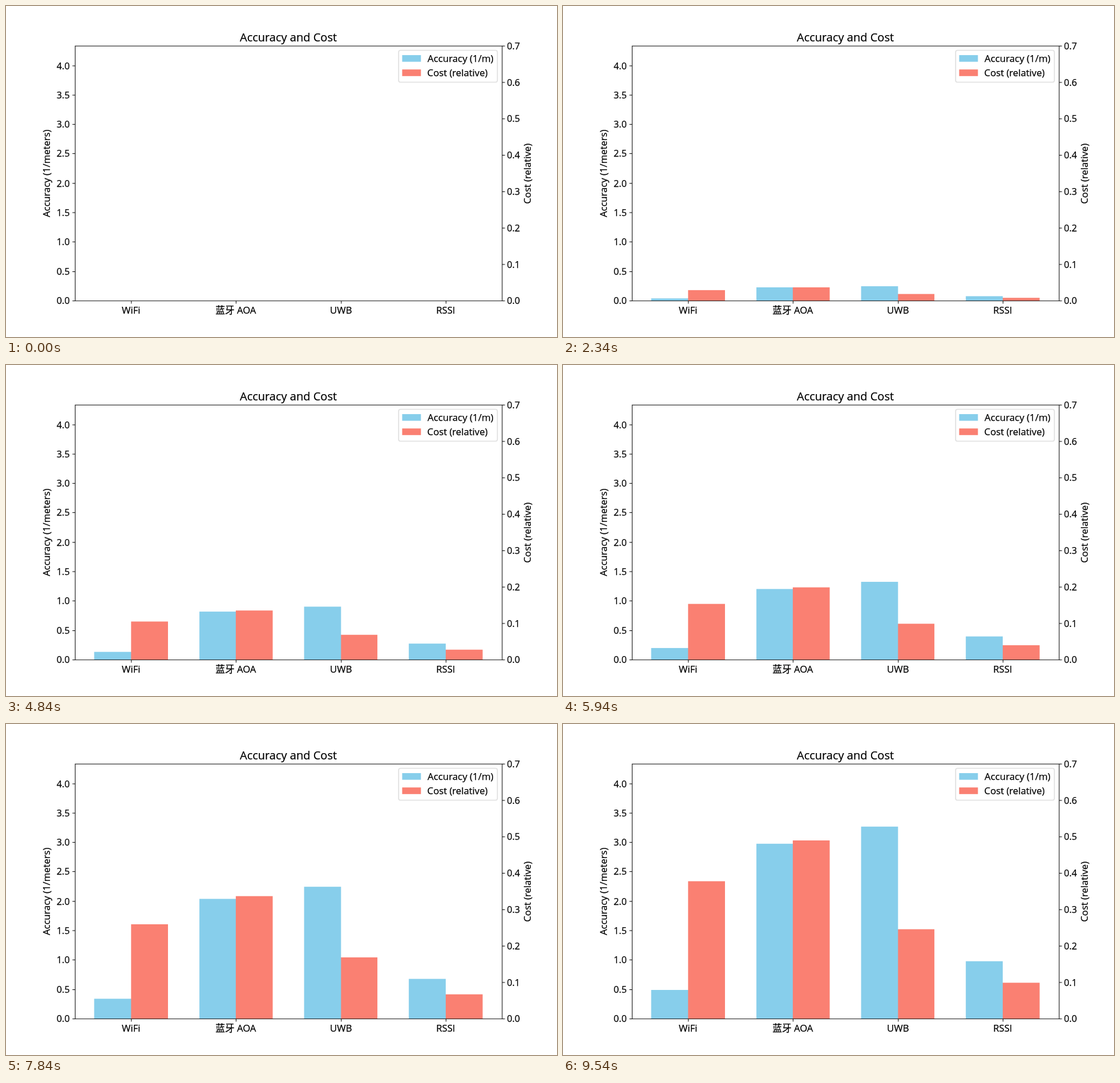
Write an HTML page with a canvas that moves like this. It is 966 px wide and 580 px high and loops after 9640 ms.

```html
<!DOCTYPE html>
<html lang="en">
<head>
<meta charset="utf-8">
<title>Accuracy and Cost</title>
<style>
  html, body { margin: 0; width: 100%; height: 100%; overflow: hidden; background: #fff; }
  canvas { display: block; width: 966px; height: 580px; }
</style>
</head>
<body>
<canvas id="chart" width="966" height="580"></canvas>
<script>
const FONT = '"Open Sans", "Noto Sans CJK SC", "Noto Sans CJK", sans-serif';
const BLUE = '#87ceeb', RED = '#fa8072';
const LOOP = 9640, FIRST = 40, STEP = 100;

// Shapes are drawn on a 1000 x 600 sheet with whole-pixel edges,
// then the sheet is scaled down softly to the stage; text goes on top.
const stage = document.getElementById('chart').getContext('2d');
const sheet = document.createElement('canvas');
sheet.width = 1000;
sheet.height = 600;
const ctx = sheet.getContext('2d');
const SX = 966 / 1000, SY = 580 / 600;

const LEFT = 125, RIGHT = 900, TOP = 72, BOTTOM = 534;
const X_MIN = -0.535, X_SPAN = 4.07;
const ACC_MAX = 13 / 3, COST_MAX = 0.7;
const plotX = v => Math.round(LEFT + (v - X_MIN) / X_SPAN * (RIGHT - LEFT));
const plotY = f => Math.round(BOTTOM - f * (BOTTOM - TOP));

const groups = [
  { name: 'WiFi', accuracy: 0.5, cost: 5 / 13 },
  { name: '蓝牙 AOA', accuracy: 1 / 0.33, cost: 0.5 },
  { name: 'UWB', accuracy: 10 / 3, cost: 0.25 },
  { name: 'RSSI', accuracy: 1, cost: 0.1 }
];

function rect(color, x0, y0, x1, y1) {
  ctx.fillStyle = color;
  ctx.fillRect(x0, y0, x1 - x0, y1 - y0);
}

function line(x0, y0, x1, y1) {
  ctx.beginPath();
  ctx.moveTo(x0 + 0.5, y0 + 0.5);
  ctx.lineTo(x1 + 0.5, y1 + 0.5);
  ctx.stroke();
}

function text(str, x, y, align = 'center', size = 16.7) {
  stage.font = `${size}px ${FONT}`;
  stage.textAlign = align;
  stage.fillStyle = stage.strokeStyle = '#000';
  stage.lineWidth = 0.25;
  stage.fillText(str, x, y);
  stage.strokeText(str, x, y);
}

function sideText(str, x, y) {
  stage.save();
  stage.translate(x, y);
  stage.rotate(-Math.PI / 2);
  text(str, 0, 0);
  stage.restore();
}

function drawBars(grow) {
  groups.forEach((g, i) => {
    const mid = plotX(i);
    rect(BLUE, plotX(i - 0.35), plotY(g.accuracy / ACC_MAX * grow), mid, BOTTOM);
    rect(RED, mid, plotY(g.cost / COST_MAX * grow), plotX(i + 0.35), BOTTOM);
  });
}

function drawAxes() {
  ctx.strokeStyle = '#000';
  ctx.lineWidth = 1.11;
  ctx.lineCap = 'square';
  line(LEFT, TOP, RIGHT, TOP);
  line(LEFT, BOTTOM, RIGHT, BOTTOM);
  line(LEFT, TOP, LEFT, BOTTOM);
  line(RIGHT, TOP, RIGHT, BOTTOM);

  ctx.lineCap = 'butt';
  for (let k = 0; k <= 8; k++) {
    const y = plotY(k / 2 / ACC_MAX);
    line(LEFT - 5, y, LEFT, y);
  }
  for (let k = 0; k <= 7; k++) line(RIGHT, plotY(k / 7), RIGHT + 5, plotY(k / 7));
  groups.forEach((g, i) => line(plotX(i), BOTTOM, plotX(i), BOTTOM + 5));
}

function drawLegend() {
  ctx.beginPath();
  ctx.roundRect(712.5, 80.4, 179.2, 57.7, 3.3);
  ctx.fillStyle = 'rgba(255, 255, 255, 0.8)';
  ctx.fill();
  ctx.strokeStyle = '#d6d6d6';
  ctx.lineWidth = 1.39;
  ctx.stroke();
  rect(BLUE, 719, 89, 753, 101);
  rect(RED, 719, 115, 753, 127);
}

function drawLabels() {
  for (let k = 0; k <= 8; k++) {
    text((k / 2).toFixed(1), 111.7, plotY(k / 2 / ACC_MAX) * SY + 6.2, 'right', 16.3);
  }
  for (let k = 0; k <= 7; k++) {
    text((k / 10).toFixed(1), 878.2, plotY(k / 7) * SY + 6.2, 'left', 16.3);
  }
  groups.forEach((g, i) => text(g.name, plotX(i) * SX, 539.2));
  text('Accuracy and Cost', 495, 61.7, 'center', 20.05);
  sideText('Accuracy (1/meters)', 77.2, 293.3);
  sideText('Cost (relative)', 919.6, 293.8);
  text('Accuracy (1/m)', 739, 97.5, 'left', 16.9);
  text('Cost (relative)', 738.6, 122.8, 'left');
}

function draw(now) {
  const t = now % LOOP;
  const step = t < FIRST ? 0 : Math.floor((t - FIRST) / STEP) + 4;
  rect('#fff', 0, 0, 1000, 600);
  drawBars((step / 100) ** 2);
  drawAxes();
  drawLegend();
  stage.drawImage(sheet, 0, 0, 966, 580);
  drawLabels();
}

const start = performance.now();
function tick() {
  draw(performance.now() - start);
  requestAnimationFrame(tick);
}
tick();
</script>
</body>
</html>
```
